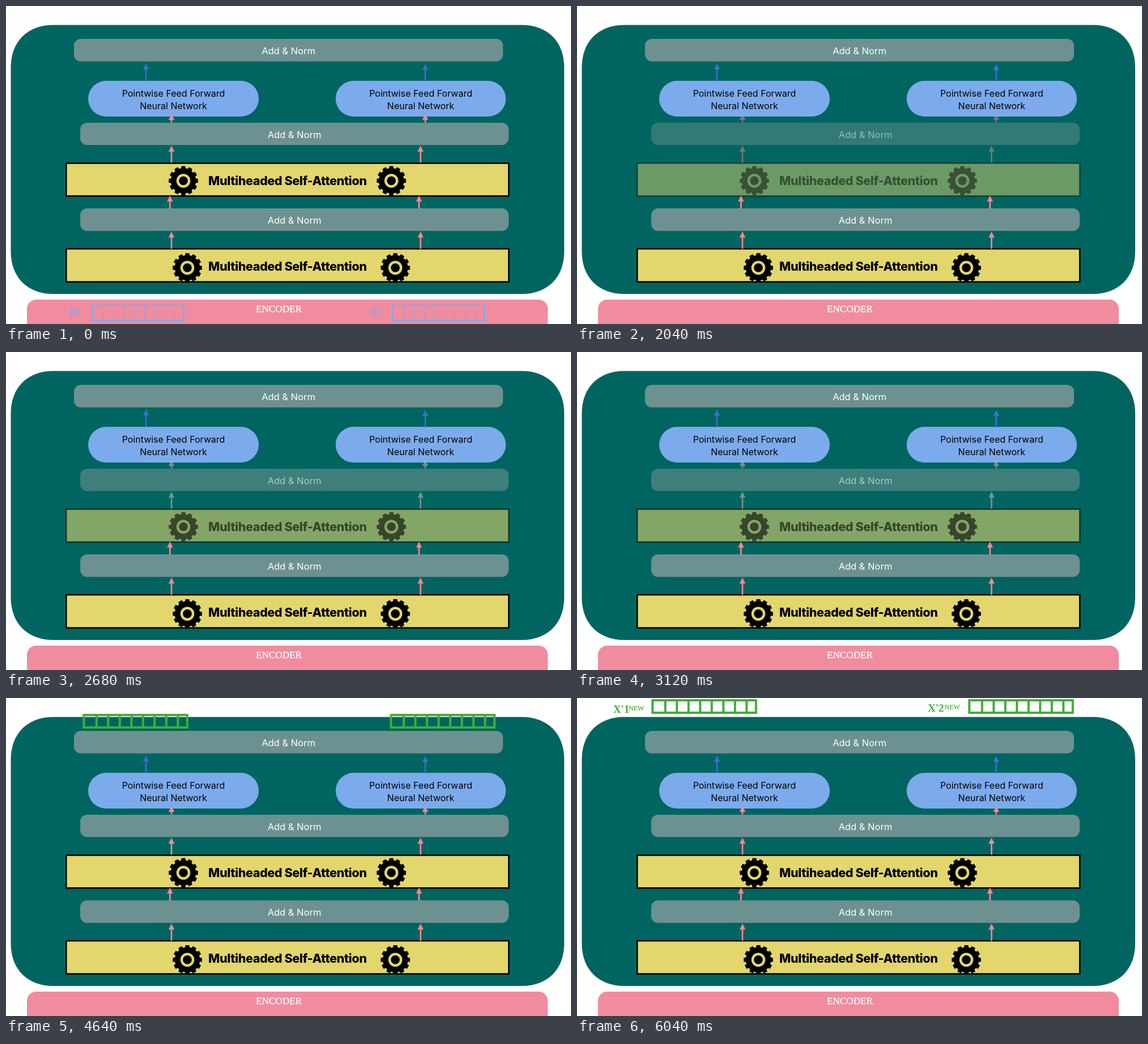
Recreate the animation shown at these times as an HTML page. Size 997 by 561 pixels, loop 6520 ms.

```html
<!DOCTYPE html>
<html lang="en">
<head>
<meta charset="utf-8">
<title>Encoder layers</title>
<style>
  html, body { margin: 0; width: 100%; height: 100%; overflow: hidden; background: #fff; }
  svg { display: block; width: 100vw; height: 100vh; }
  text { white-space: pre; }
  .label { font: 400 16.5px Inter, sans-serif; text-anchor: middle; }
  .pill { font: 400 16px Inter, sans-serif; text-anchor: middle; }
  .title { font: 800 21.5px Inter, sans-serif; letter-spacing: -0.4px; text-anchor: middle; }
  .serif { font-family: "Liberation Serif", serif; }
</style>
</head>
<body>
<svg id="stage" viewBox="0 0 997 561" xmlns="http://www.w3.org/2000/svg"></svg>
<script>
const LOOP = 6520, STEP = 40;
const TEAL = '#006560', GREY = '#6d9190', YELLOW = '#e2d66d', BLUE = '#7cabed';
const PINK = [255, 133, 147], FADED = [215, 174, 174], NAVY = '#3c6fd0', GREEN = '#42ad38';
const stage = document.getElementById('stage');
const rgb = c => `rgb(${c.map(Math.round).join()})`;

const rect = (x, y, w, h, r, fill, more = '') =>
  `<rect x="${x}" y="${y}" width="${w}" height="${h}" rx="${r}" fill="${fill}" ${more}/>`;

const text = (x, y, cls, fill, str, more = '') =>
  `<text x="${x}" y="${y}" class="${cls}" fill="${fill}" ${more}>${str}</text>`;

// Rounded panel with slightly squared-off corners
function panel(l, t, r, b, c) {
  const k = c * 0.39;
  return `<path fill="${TEAL}" d="M${l} ${t + c}C${l} ${t + k} ${l + k} ${t} ${l + c} ${t}
    H${r - c}C${r - k} ${t} ${r} ${t + k} ${r} ${t + c}
    V${b - c}C${r} ${b - k} ${r - k} ${b} ${r - c} ${b}
    H${l + c}C${l + k} ${b} ${l} ${b - k} ${l} ${b - c}Z"/>`;
}

// Each part carries the class "dim" when it belongs to the second attention layer
const part = (body, dim) => dim ? `<g class="dim">${body}</g>` : body;

function bar(x, y, w, h, dim) {
  return part(rect(x, y, w, h, 12, GREY), dim) +
    part(text(x + w / 2, y + h / 2 + 7, 'label', '#fff', 'Add &amp; Norm'), dim);
}

function gear(cx, cy) {
  const teeth = 12, outer = 26, inner = 22.3, pts = [];
  for (let i = 0; i < teeth; i++) {
    for (const [off, r] of [[-0.34, inner], [-0.25, outer], [0.25, outer], [0.34, inner]]) {
      const a = (i + off) / teeth * 2 * Math.PI;
      pts.push((cx + r * Math.sin(a)).toFixed(2) + ' ' + (cy - r * Math.cos(a)).toFixed(2));
    }
  }
  const ring = r => `M${cx - r} ${cy}a${r} ${r} 0 1 0 ${2 * r} 0a${r} ${r} 0 1 0 ${-2 * r} 0Z`;
  return `<path fill-rule="evenodd" d="M${pts.join('L')}Z${ring(12.3)}${ring(7.8)}"/>`;
}

const box = (y, h, dim) => part(rect(106.2, y + 1.3, 781, h - 2.6, 0, YELLOW), dim) +
  part(rect(106.2, y + 1.3, 781, h - 2.6, 0, 'none', 'stroke="#000" stroke-width="2.6"'), dim);

const gears = (x, y, dim) => part(gear(x, y), dim) + part(gear(x + 367, y), dim);

const title = (y, dim) => part(text(496.8, y, 'title', '#000', 'Multiheaded Self-Attention'), dim);

function arrow(x, top, bottom, color, dim) {
  const body = `<path d="M${x} ${top}l5.2 10.5h-3.9V${bottom}h-2.6V${top + 10.5}h-3.9Z"
    ${dim ? '' : `fill="${color}"`}/>`;
  return dim ? `<g class="dim tint">${body}</g>` : body;
}

function pill(x, w) {
  const mid = x + w / 2;
  return rect(x, 132, w, 63, 31.5, BLUE) +
    text(mid, 159.7, 'pill', '#000', 'Pointwise Feed Forward') +
    text(mid, 181.5, 'pill', '#000', 'Neural Network');
}

function inputRow(id, x, n) {
  let lines = '';
  for (let i = 0; i < 8; i++) lines += `M${x + 60.5 + i * 18.1} 528V554`;
  return `<g id="${id}">` +
    text(x, 546, 'serif', BLUE, `R<tspan font-size="15">${n}</tspan>`,
      `font-size="19" stroke="${BLUE}" stroke-width=".35"`) +
    `<path d="${lines}" stroke="${BLUE}" stroke-width="1.1" opacity=".8"/>` +
    rect(x + 40.5, 528, 161.5, 26.8, 0, 'none', `stroke="${BLUE}" stroke-width="2.5"`) + '</g>';
}

function outputRow(id) {
  let lines = '';
  for (let i = 0; i < 8; i++) lines += `M${24.5 + i * 20.5} 2V24`;
  return `<g id="${id}" fill="none" stroke="${GREEN}" stroke-width="4">` +
    `<rect x="2" y="2" width="182.5" height="22"/><path d="${lines}"/></g>`;
}

const outputLabel = (x, y, n, gap) =>
  text(x, y, 'serif', GREEN, `X'${n}`, 'font-size="19" font-weight="700"') +
  text(x + gap, y - 4, 'serif', GREEN, 'NEW', `font-size="12" stroke="${GREEN}" stroke-width=".2"`);

const pair = (a, b, top, bottom, color, dim) =>
  arrow(a, top, bottom, color, dim) + arrow(b, top, bottom, color, dim);

const pink = rgb(PINK);
stage.innerHTML =
  rect(37, 518, 919, 70, 16, '#f18c9f') +
  text(481.5, 540.3, 'serif', '#fff', 'ENCODER',
    'font-size="17.2" text-anchor="middle" stroke="#fff" stroke-width=".3"') +
  panel(8.5, 33.5, 985, 508, 75) +
  bar(120, 58, 757, 39.7) +
  bar(131, 206, 756, 39.3, true) +
  bar(131, 357, 756, 39.7) +
  box(276, 60.5, true) + gears(313, 308.3, true) + title(315.6, true) +
  box(427, 61) +
  inputRow('in1', 111.7, 1) + inputRow('in2', 642, 2) +
  gears(320, 461.8) + title(466.8) +
  pill(145, 301) + pill(581.7, 300.3) +
  arrow(247, 101.5, 132.5, NAVY) + arrow(739.8, 102.5, 133, NAVY) +
  pair(292, 739.8, 190.5, 205.5, pink, true) +
  pair(292, 731.5, 246.5, 276.5, pink, true) +
  pair(289.3, 728.8, 334.5, 357.5, pink) +
  pair(292, 731.5, 398, 428.5, pink) +
  outputRow('out1') + outputRow('out2') +
  '<g id="names">' + outputLabel(64, 26, 1, 27) + outputLabel(619, 24, 2, 29.5) + '</g>';

const $ = id => document.getElementById(id);
const dims = stage.querySelectorAll('.dim'), tints = stage.querySelectorAll('.tint');
const [in1, in2, out1, out2, names] = ['in1', 'in2', 'out1', 'out2', 'names'].map($);

const mix = (a, b, p) => a + (b - a) * p;
function ease(t, from, to) {
  const u = Math.min(1, Math.max(0, (t - from) / (to - from)));
  return u * u * (3 - 2 * u);
}
const place = (el, x, y, alpha) => {
  el.setAttribute('transform', `translate(${x.toFixed(2)} ${y.toFixed(2)})`);
  el.setAttribute('opacity', alpha);
};

function draw(t) {
  // Inputs rise into the lower attention box and dissolve
  const rise = ease(t, 520, 960), gone = 1 - ease(t, 920, 1200);
  place(in1, 0, -83 * rise, gone);
  place(in2, 9.8 * rise, -83 * rise, gone);

  // Second layer dims, brightens a little, then returns
  const settle = ease(t, 1960, 2600), back = ease(t, 4120, 4600);
  let alpha = mix(1, 0.47, ease(t, 1000, 1480));
  alpha = mix(mix(alpha, 0.58, settle), 1, back);
  dims.forEach(el => el.setAttribute('opacity', alpha));
  const color = rgb(PINK.map((c, i) => mix(c, FADED[i], settle * (1 - back))));
  tints.forEach(el => el.setAttribute('fill', color));

  // Outputs leave through the top bar
  const lift = ease(t, 4120, 5050), shown = ease(t, 4120, 4440);
  place(out1, mix(141, 131.3, lift), mix(65, 2, lift), shown);
  place(out2, mix(659, 690.3, lift), mix(65, 2, lift), shown);
  names.setAttribute('opacity', ease(t, 5080, 6000));
}

const start = performance.now();
function tick() {
  const t = (performance.now() - start) % LOOP;
  draw(Math.floor(t / STEP) * STEP);
  requestAnimationFrame(tick);
}
tick();
</script>
</body>
</html>
```
